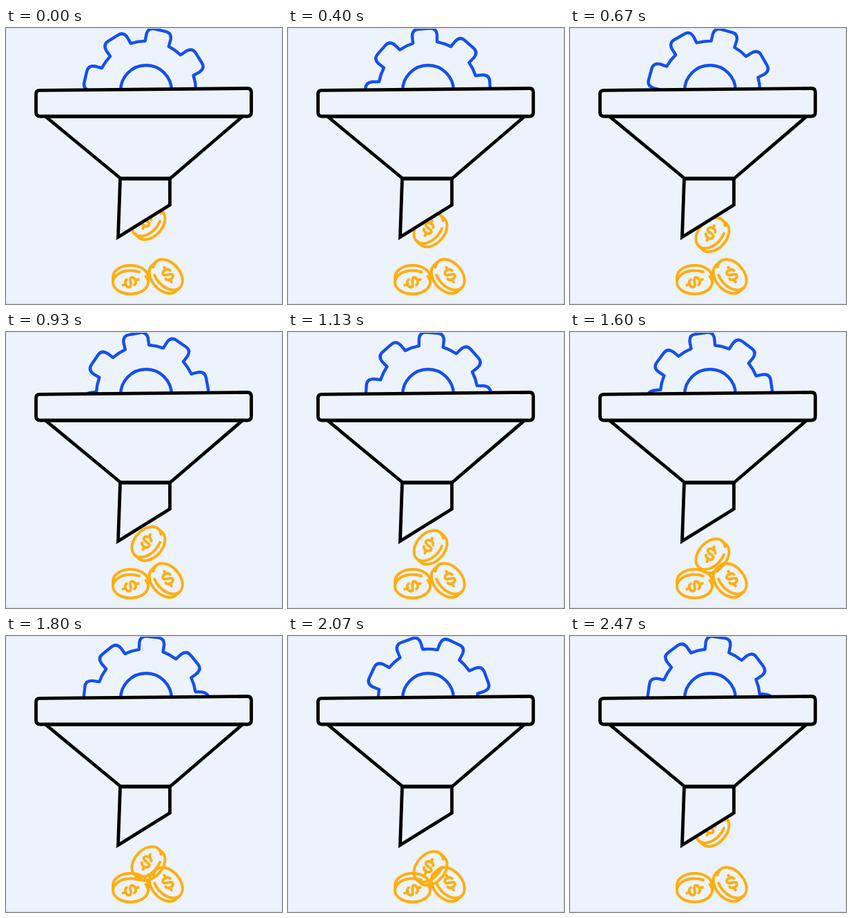
These frames come from a looping animation (400x400 px, 2.54 s). An HTML page:

```html
<!DOCTYPE html>
<html lang="en">
<head>
<meta charset="utf-8">
<title>Gear and coin funnel</title>
<style>
  html, body { margin: 0; width: 100%; height: 100%; overflow: hidden; background: #edf3fc; }
  svg { display: block; width: 100vw; height: 100vh; }
  path, circle { fill: none; stroke-linecap: round; stroke-linejoin: round; }
  #wheel, #hub { stroke: #1450ee; stroke-width: 4.4; }
  .coin { stroke: #ffae13; stroke-width: 4; }
  .funnel { stroke: #000; stroke-width: 4.8; }
  .funnel path { fill: #edf3fc; }
  .spout { stroke-linejoin: miter; }
</style>
</head>
<body>
<svg viewBox="0 0 400 400">
  <defs>
    <g id="disc">
      <path d="M-25.5 0A25.5 17 0 0 1 25.5 0V7.5A25.5 17 0 0 1-25.5 7.5Z"/>
      <path d="M-25.5 0A25.5 17 0 0 0 25.5 0" pathLength="100" stroke-dasharray="69 17 14"/>
    </g>
    <path id="dollar" d="M5.5-4C4.5-9-6-9-6-3.5C-6 1.5 6-1.5 6 3.5C6 9-4.5 9-5.5 4M0-7.5V-12M0 7.5V12"/>
  </defs>
  <path id="wheel"/>
  <circle id="hub" cx="203" cy="91" r="37"/>
  <g class="coin">
    <g transform="translate(180.5 368.5)">
      <use href="#disc" transform="scale(1 -1)"/>
      <use href="#dollar" transform="rotate(70)"/>
    </g>
    <g transform="translate(234.6 357.5)">
      <use href="#disc" transform="rotate(48) scale(-1 1)"/>
      <use href="#dollar" transform="rotate(-26)"/>
    </g>
    <g id="drop">
      <use href="#disc" transform="rotate(-48)"/>
      <use href="#dollar" transform="rotate(26)"/>
    </g>
  </g>
  <g class="funnel">
    <path d="M57 128L166 218H238L343 128Z"/>
    <path class="spout" d="M165.5 218.5H237.5V256.5L162.5 303Z"/>
    <path d="M49 90.3L350 87.5Q355.5 87.5 355.5 93V122Q355.5 128 350 128H49Q43.5 128 43.5 122V96Q43.5 90.3 49 90.3Z"/>
  </g>
  <path d="M.5.5H399.5V399.5H.5Z" stroke="#dadfe8"/>
</svg>
<script>
  const LOOP = 2540, STEP = 1000 / 15, STEPS = 38, TEETH = 8;
  const COIN_RESET = 34;
  const wheel = document.getElementById('wheel');
  const drop = document.getElementById('drop');

  // One tooth, pointing up from the gear centre.
  const tooth = [[-17.5, -70], [-18, -80], [-17.5, -90], [-8.5, -90],
                 [8.5, -90], [17.5, -90], [18, -80], [17.5, -70]];

  function gearPath() {
    let d = '';
    for (let i = 0; i < TEETH; i++) {
      const a = i * 2 * Math.PI / TEETH, c = Math.cos(a), s = Math.sin(a);
      const p = tooth.map(([x, y]) => `${x * c - y * s} ${x * s + y * c}`);
      d += `${i ? 'A72 72 0 0 1 ' : 'M'}${p[0]}L${p[1]}Q${p[2]} ${p[3]}L${p[4]}Q${p[5]} ${p[6]}L${p[7]}`;
    }
    return d + `A72 72 0 0 1 ${tooth[0].join(' ')}Z`;
  }

  function draw(now) {
    const step = Math.min(STEPS - 1, Math.floor((now % LOOP + 5) / STEP));
    const fall = step < COIN_RESET ? step : step - STEPS;
    wheel.setAttribute('transform', `translate(203 91) rotate(${13 + step * 180 / STEPS})`);
    drop.setAttribute('transform', `translate(203.7 ${279.5 + fall * 1.77})`);
  }

  wheel.setAttribute('d', gearPath());
  const start = performance.now();
  function tick() {
    draw(performance.now() - start);
    requestAnimationFrame(tick);
  }
  tick();
</script>
</body>
</html>
```
